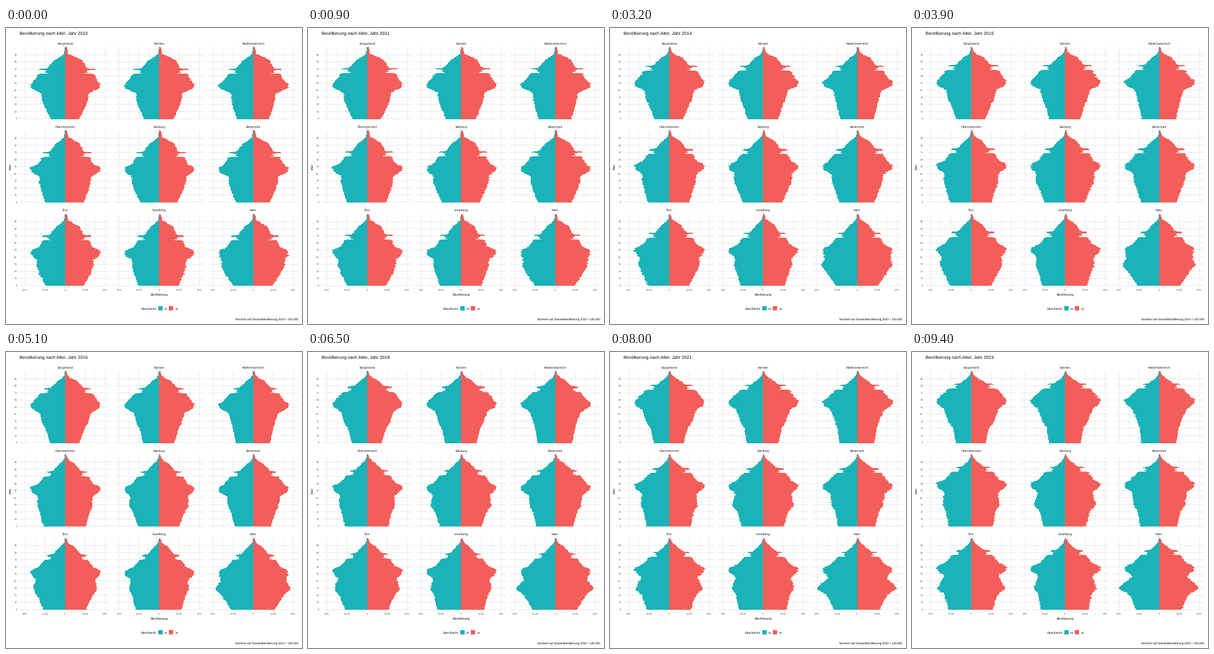
A matplotlib script for the animation above (10000 ms loop, 480 px wide and 480 px high).

```python
import numpy as np
import matplotlib.pyplot as plt
from matplotlib.animation import FuncAnimation

plt.rcParams["font.family"] = "Liberation Sans"
plt.rcParams["text.hinting"] = "none"

SIZE, DPI = 480, 72
FIRST_YEAR, SPAN = 2010, 13
TEAL, RED, GRID = "#19b3b8", "#f45e5a", "#ebebeb"
PX_PER_YEAR, PX_PER_SHARE = 1.153, 6515
ZERO_X = [96.0, 248.4, 401.0]
BASE_Y = [147.0, 282.3, 417.5]
CHANGES = [8, 16, 24, 31, 38, 45, 51, 58, 65, 72, 79, 86, 93]
AGES = np.arange(101)
EDGES = np.arange(102) - 0.5
BOOM = 56

# Male bar length in pixels at birth and around age 27.
STATES = {
    "Burgenland": (24, 38),
    "Kärnten": (25, 37),
    "Niederösterreich": (27, 36),
    "Oberösterreich": (32, 42),
    "Salzburg": (31, 44),
    "Steiermark": (28, 40),
    "Tirol": (32, 46),
    "Vorarlberg": (34, 44),
    "Wien": (33, 51),
}

rng = np.random.default_rng(7)
JITTER = {state: rng.normal(1, 0.016, (2, len(AGES) + SPAN)) for state in STATES}


def mix(a, b, t):
    return np.asarray(a) * (1 - t) + np.asarray(b) * t


def bell(x, center, width, power=2):
    return np.exp(-np.abs((x - center) / width) ** power)


def soft_interp(x, xs, ys):
    """Interpolate between knots, slightly rounded at each of them."""
    index = np.arange(len(xs))
    pos = np.interp(x, xs, index)
    f = pos % 1
    return np.interp(pos - f + (f + f * f * (3 - 2 * f)) / 2, index, ys)


def male_outline(child, young, t):
    """Youth keeps its age; the baby boom and the old move up with time."""
    eased = np.sin(t * np.pi / 2)
    senior = 64 - 0.8 * child
    child = mix(child, 1.5 * child - 11, eased)
    young = young + 1.1 * max(0, young - 38) * eased
    ages = mix([0, 8, 18, 27, 35, 43, 48, 55, 61, 74, 81, 89, 91.5, 100],
               [0, 9, 20, 30, 47, 55, 60, 66, 74, 86, 90, 95, 98, 100], t)
    youth = [child, mix(child, young, mix(0.35, 0.15, t)),
             mix(child, young, mix(0.75, 0.35, t)), young, mix(young, 44, t)]
    old = senior * mix([1.1, 1, 0.58, 0.42], [1.1, 0.88, 0.32, 0.17], t)
    tail = mix([5, 1.8, 0.6], [2.3, 1.2, 0.6], t)
    return soft_interp(AGES, ages, [*youth, BOOM - 1, BOOM, *old, *tail])


def female_ratio(t):
    return (0.95 + 0.05 * np.minimum(AGES / 40, 1)
            + 0.07 * np.exp((AGES - 61 - 8 * t) / 9.9))


def cohort_factor(cohort):
    """High births around 1940, few during and just after the war."""
    return (1 + 0.4 * bell(cohort, 69.5, 1) - 0.18 * bell(cohort, 65.7, 2.2, 4)
            - 0.2 * bell(cohort, 64, 0.6))


def bar_lengths(state, sex, step):
    t = step / SPAN
    cohort = AGES - step
    lengths = male_outline(*STATES[state], t) * cohort_factor(cohort)
    if sex == 1:
        lengths = lengths * female_ratio(t)
    return lengths * JITTER[state][sex, cohort + SPAN]


LENGTHS = {
    (state, sex): [bar_lengths(state, sex, step) for step in range(SPAN + 1)]
    for state in STATES for sex in (0, 1)
}

fig = plt.figure(figsize=(SIZE / DPI, SIZE / DPI), dpi=DPI, facecolor="white")
ax = fig.add_axes([0, 0, 1, 1])
ax.set(xlim=(0, SIZE), ylim=(SIZE, 0))
ax.axis("off")


def label(x, y, text, size, color="black", ha="left", **kwargs):
    return ax.text(x, y, text, fontsize=size, color=color, ha=ha,
                   **{"va": "baseline", **kwargs})


def grid_line(xs, ys, width):
    ax.plot(xs, ys, color=GRID, lw=width, snap=False,
            solid_capstyle="butt", zorder=1)


def draw_panel(zero, base, state):
    top, bottom = base - 100.6 * PX_PER_YEAR, base + 0.6 * PX_PER_YEAR
    for k in range(-4, 5):
        x = zero + k * 0.0025 * PX_PER_SHARE
        grid_line([x, x], [top, bottom], 0.53 if k % 2 else 1.07)
    for age in range(0, 100, 10):
        y = base - age * PX_PER_YEAR
        grid_line([zero - 73.4, zero + 73], [y, y], 1.07)
    label(zero, base - 120.3, state, 5, "#1a1a1a", "center")


def make_bars(zero, base, color):
    return ax.stairs(np.full(len(AGES), zero), base - EDGES * PX_PER_YEAR,
                     baseline=zero, orientation="horizontal", fill=True,
                     color=color, lw=0, snap=True, zorder=2)


bars = []
for i, state in enumerate(STATES):
    zero, base = ZERO_X[i % 3], BASE_Y[i // 3]
    draw_panel(zero, base, state)
    for sex, color in enumerate((TEAL, RED)):
        bars.append((make_bars(zero, base, color), zero, state, sex))

for base in BASE_Y:
    for age in range(0, 100, 10):
        label(17.8, base - age * PX_PER_YEAR + 1.45, str(age), 4, "#4d4d4d", "right")
for zero in ZERO_X:
    for share in (-0.01, -0.005, 0, 0.005, 0.01):
        label(zero + share * PX_PER_SHARE, 426, f"{abs(share):g}", 4,
              "#4d4d4d", "center")

title = label(22.3, 10.8, "", 7.2)
label(248.5, 433.7, "Bevölkerung", 5, ha="center")
label(7.4, 224.5, "Alter", 5, ha="center", va="center", rotation=90)
label(218.3, 456.7, "Geschlecht", 5)
for x, name, color in ((247, "m", TEAL), (264, "w", RED)):
    ax.add_patch(plt.Rectangle((x, 451), 7, 7, color=color, lw=0))
    label(x + 10, 456.7, name, 5)
label(474, 473.8, "Normiert auf Gesamtbevölkerung 2010 = 100.000", 4.65, ha="right")


def update(frame):
    step = sum(frame > change for change in CHANGES)
    tween = 0.5 if frame in CHANGES else 0
    title.set_text(f"Bevölkerung nach Alter, Jahr {FIRST_YEAR + step}")
    for patch, zero, state, sex in bars:
        series = LENGTHS[state, sex]
        length = mix(series[step], series[min(step + 1, SPAN)], tween)
        patch.set_data(values=zero + (length if sex else -length))
    return [title] + [bar[0] for bar in bars]


anim = FuncAnimation(fig, update, frames=100, interval=100, repeat=True,
                     repeat_delay=0, blit=False)
plt.show()
```
